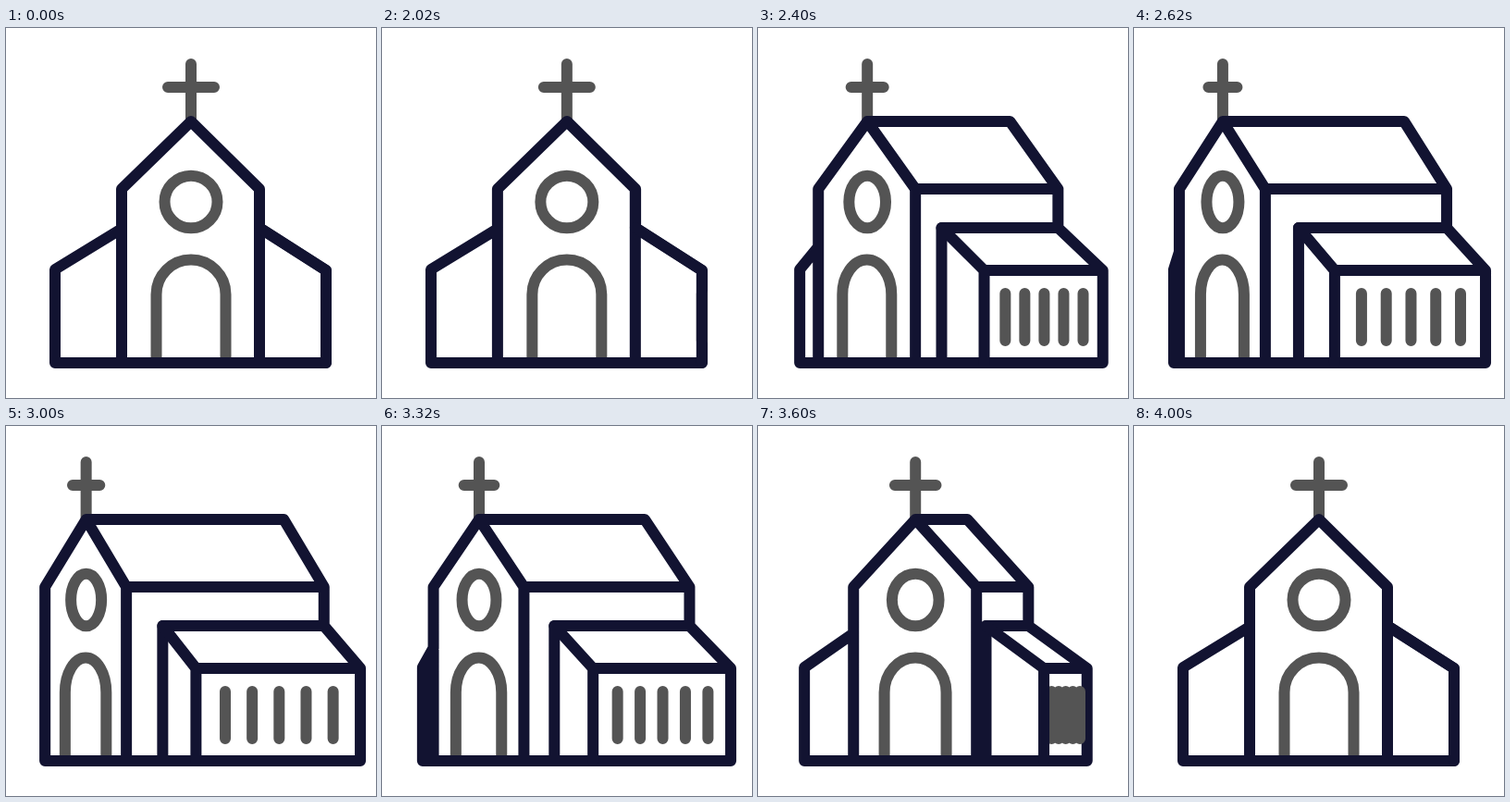
An HTML page for the animation above (4020 ms loop, 400 px wide and 400 px high).

```html
<!DOCTYPE html>
<html lang="en">
<head>
<meta charset="utf-8">
<title>Turning church</title>
<style>
  html, body { margin: 0; width: 100%; height: 100%; overflow: hidden; background: #fff; }
  svg { display: block; width: 100%; height: 100%; }
  path { fill: none; stroke: #121331; stroke-width: 12; stroke-linecap: round; stroke-linejoin: round; }
  .soft { stroke: #545454; }
</style>
</head>
<body>
<svg viewBox="0 0 400 400">
  <path id="trim" class="soft"/>
  <path id="walls"/>
  <path id="bars" class="soft"/>
  <path id="corner"/>
</svg>
<script>
const LOOP = 4020, OUT = 2000, BACK = 3000, SPAN = 1000;
const MAX_TURN = 1.09;
const BASE = 362, EAVE = 174;

// Cubic bezier easing with handles (a, 0) and (b, 1)
function ease(x, a, b) {
  if (x <= 0) return 0;
  if (x >= 1) return 1;
  let lo = 0, hi = 1, s;
  for (let i = 0; i < 24; i++) {
    s = (lo + hi) / 2;
    const r = 1 - s;
    if (3 * r * r * s * a + 3 * r * s * s * b + s ** 3 < x) lo = s;
    else hi = s;
  }
  return s * s * (3 - 2 * s);
}

function turnAt(t) {
  const out = ease((t - OUT) / SPAN, 0.333, 0.1);
  const back = ease((t - BACK) / SPAN, 0.58, 0.4);
  return MAX_TURN * (out - back);
}

const line = (...points) => 'M' + points.map(p => p.join(' ')).join('L');
const set = (id, ...parts) => document.getElementById(id).setAttribute('d', parts.join(''));

function draw(turn) {
  const mix = (front, side) => front + (side - front) * turn;

  const peak = mix(200, 96), ridge = mix(200, 292);
  const left = mix(125, 49), right = mix(274, 142), rear = mix(274, 338);
  const wing = mix(53, 43), wingTop = mix(217, 242);
  const annex = mix(274, 178), front = mix(346, 217), end = mix(346, 380);

  const arm = mix(25, 15.5), rx = mix(28.5, 17.5);
  const doorL = mix(162.5, 72), doorR = mix(237.5, 119);

  set('trim',
    line([peak, 39], [peak, 100]),
    line([peak - arm, 64], [peak + arm, 64]),
    `M${peak - rx} 188a${rx} 28.3 0 1 1 ${2 * rx} 0a${rx} 28.3 0 1 1 ${-2 * rx} 0z`,
    `M${doorL} ${BASE}V288A${(doorR - doorL) / 2} 37.5 0 0 1 ${doorR} 288V${BASE}`);

  set('walls',
    line([left, BASE], [left, EAVE], [peak, 101], [right, EAVE], [right, BASE]),
    line([peak, 101], [ridge, 101], [rear, EAVE], [right, EAVE]),
    line([rear, EAVE], [rear, 216]),
    line([left, wingTop], [wing, 261], [wing, BASE], [end, BASE], [end, 262], [rear, 216], [annex, 216], [annex, BASE]),
    line([front, 262], [end, 262]));

  set('bars', ...[0, 1, 2, 3, 4].map(i => {
    const x = mix(346, 246 + 26.75 * i);
    return line([x, 287], [x, 338]);
  }));

  // The near corner hides the side windows in the front view
  set('corner', line([annex, 216], [front, 262], [front, BASE]));
}

const start = performance.now();
function tick() {
  draw(turnAt((performance.now() - start) % LOOP));
  requestAnimationFrame(tick);
}
tick();
</script>
</body>
</html>
```
